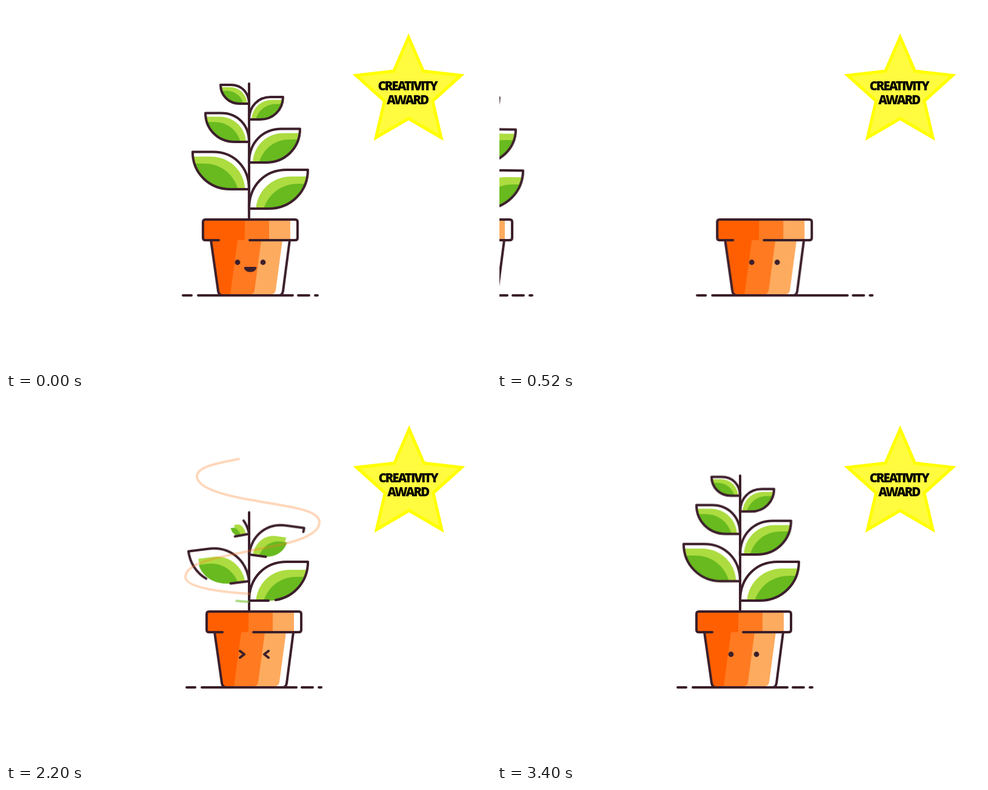
Write an HTML page without scripts that moves like this. It is 800 by 600 pixels and loops after 3.84 s.

```html
<!DOCTYPE html>
<html lang="en">
<head>
<meta charset="utf-8">
<title>Growing plant</title>
<style>
@property --p { syntax: "<number>"; inherits: true; initial-value: 1; }
@property --q { syntax: "<number>"; inherits: true; initial-value: 0; }
@property --j { syntax: "<number>"; inherits: true; initial-value: 0; }

html, body { margin: 0; width: 100%; height: 100%; overflow: hidden; background: #fff; }
svg { display: block; width: 100vw; height: 100vh; }

.line { fill: none; stroke: #3c1f2b; stroke-width: 4; stroke-linecap: round; stroke-linejoin: round; }
.ink { fill: #3c1f2b; }
.c1 { fill: #ff5f00; }
.c2 { fill: #ff7a20; }
.c3 { fill: #fdab5f; }
.c4 { fill: #fff; }

/* Leaves: --p is the drawn part, --q the droop in degrees */
.leaf {
  transform: translate(401px, var(--y)) scale(calc(var(--s) * var(--f, 1)), var(--s)) rotate(calc(var(--k, 1) * var(--q) * 1deg));
}
.edge { stroke-width: calc(4px / var(--s)); }
.edge, .stem { stroke-dasharray: calc(var(--p) * 1.01px) 2px; }
.tone { transform: translate(var(--dx, 0px), var(--dy, 0px)) scale(calc(.02 + .98 * var(--p)), calc(.28 + .72 * var(--p))); }
.light { fill: #acdc40; transform-origin: 7px 0; }
.dark { fill: #68ba1f; transform-origin: 19px 0; }

.n1 { --y: 334px; --s: 1; --k: 0; --dx: 4px; --dy: 3px; --t: 1685ms; }
.n2 { --y: 302px; --s: .96; --f: -1; --t: 1840ms; }
.n3 { --y: 258px; --s: .866; --t: 1960ms; }
.n4 { --y: 224px; --s: .742; --f: -1; --t: 2120ms; }
.n5 { --y: 187px; --s: .577; --t: 2555ms; }
.n6 { --y: 161px; --s: .485; --f: -1; --t: 2594ms; }

.loop, .grow .leaf, .grow .stem, .pop { animation: 3840ms linear infinite both; }
.grow .leaf { animation-name: grow; animation-delay: var(--t); }
.grow .stem { animation-name: rise; }
.grow { animation-name: sprout; }
.leave { animation-name: leave; }
.lean { animation-name: lean; transform-origin: 401px 352px; }
.slide { animation-name: slide; }
.reach { animation-name: reach; }
.tail { animation-name: tail; }
.tense { animation-name: tense; }
.shake { animation: shake 160ms linear infinite; }
.calm { animation-name: calm; }
.strain { animation-name: strain; }
.star { animation-name: nudge; }
.swirl { fill: none; stroke-width: 4; }
.s1 { animation-name: swirl1; }
.s2 { animation-name: swirl2; }
.pop { animation-name: pop; animation-delay: var(--t); transform-box: fill-box; transform-origin: center; }

@keyframes leave {
  0% { transform: none; }
  3.125% { transform: translateX(-13px); }
  6.25% { transform: translateX(-56px); }
  8.333% { transform: translateX(-121px); }
  10.417% { transform: translateX(-226px); }
  11.979% { transform: translateX(-329px); }
  13.542% { transform: translateX(-454px); }
  14.583%, 100% { transform: translateX(-540px); }
}
@keyframes lean {
  0% { transform: none; }
  6.25% { transform: rotate(3.6deg); }
  13.542%, 100% { transform: rotate(.8deg); }
}
@keyframes slide {
  0% { transform: translateX(1068px); animation-timing-function: cubic-bezier(.16, 1, .3, 1); }
  27.6%, 100% { transform: none; }
}
@keyframes reach {
  0% { stroke-dasharray: 2376px 3000px; animation-timing-function: cubic-bezier(.16, 1, .3, 1); }
  27.6%, 100% { stroke-dasharray: 156px 3000px; }
}
@keyframes tail {
  0% { transform: translateX(2220px); animation-timing-function: cubic-bezier(.16, 1, .3, 1); }
  27.6%, 100% { transform: none; }
}
@keyframes tense {
  0%, 15% { --j: 0; transform: translateX(6px); }
  26% { transform: translateX(4px); }
  30.2% { --j: 0; }
  30.21%, 86% { --j: 1; }
  87.5%, 100% { --j: 0; transform: translateX(4px); }
}
@keyframes shake {
  0%, 50%, 100% { transform: none; }
  25% { transform: translateX(calc(var(--j) * -1.5px)); }
  75% { transform: translateX(calc(var(--j) * 2px)); }
}
@keyframes calm {
  0%, 20.8% { opacity: 1; }
  20.81%, 78.1% { opacity: 0; }
  78.11%, 100% { opacity: 1; }
}
@keyframes strain {
  0%, 20.8% { opacity: 0; }
  20.81%, 78.1% { opacity: 1; }
  78.11%, 100% { opacity: 0; }
}
@keyframes sprout {
  0%, 43.74% { opacity: 0; }
  43.75%, 100% { opacity: 1; }
}
@keyframes rise {
  0%, 43.75% { --p: 0; }
  44.79% { --p: .093; }
  51% { --p: .43; }
  56% { --p: .68; }
  66%, 100% { --p: 1; }
}
@keyframes grow {
  0% { --p: 0; --q: 12; opacity: 0; animation-timing-function: cubic-bezier(.3, .7, .4, 1); }
  .05% { opacity: 1; }
  13% { --q: 7; }
  20.83% { --p: 1; --q: 0; }
  56.24% { --p: 1; --q: 0; opacity: 1; }
  56.25%, 100% { --p: 1; --q: 0; opacity: 0; }
}
/* Dash pattern: nothing, gap up to the tail, visible trail, gap */
@keyframes swirl1 {
  0%, 47% { stroke-dasharray: 0 0 0 2; }
  58% { stroke-dasharray: 0 0 .95 2; }
  61% { stroke-dasharray: 0 .1 .9 2; }
  67.7% { stroke-dasharray: 0 .885 .115 2; }
  69.5%, 100% { stroke-dasharray: 0 1 0 2; }
}
@keyframes swirl2 {
  0%, 57% { stroke-dasharray: 0 0 0 2; }
  67.7% { stroke-dasharray: 0 0 1 2; }
  73% { stroke-dasharray: 0 .68 .32 2; }
  77%, 100% { stroke-dasharray: 0 1 0 2; }
}
@keyframes pop {
  0% { transform: scale(0); }
  5%, 9% { transform: scale(1); }
  13%, 100% { transform: scale(0); }
}
@keyframes nudge {
  0%, 10.4% { transform: none; }
  10.41%, 100% { transform: translateX(1px); }
}

text {
  font: 800 20.5px "Open Sans", sans-serif;
  letter-spacing: -2.1px;
  text-anchor: middle;
}
</style>
</head>
<body>
<svg viewBox="0 0 800 600">
  <defs>
    <path id="blade" pathLength="1" d="M32 0H0C0-38 26-64 62-64H97C97-28 69 0 32 0Z"/>
    <clipPath id="inBlade"><use href="#blade"/></clipPath>
    <g id="leaf">
      <g clip-path="url(#inBlade)">
        <path class="tone light" d="M7 0C8-30 32-56 66-56H97C97-28 69 0 32 0Z"/>
        <path class="tone dark" d="M19 0C26-24 46-44 78-44H95C92-22 69 0 32 0Z"/>
      </g>
      <use class="line edge" href="#blade"/>
    </g>

    <path id="cup" d="M338 386L350 470Q351 477 358 477H450Q456 477 457 470L468 386"/>
    <clipPath id="inCup"><use href="#cup"/></clipPath>
    <g id="pot">
      <g clip-path="url(#inCup)">
        <path class="c4" d="M330 386H475V478H330Z"/>
        <path class="c3" d="M330 386H456L445 468Q444 475 438 475H330Z"/>
        <path class="c2" d="M330 386H421L410 468Q409 475 403 475H330Z"/>
        <path class="c1" d="M330 386H382L370 475H330Z"/>
      </g>
      <rect class="c4" x="325" y="352" width="156" height="34" rx="4"/>
      <path class="c3" d="M394 352H469V386H394Z"/>
      <path class="c2" d="M390 352H434V386H390Z"/>
      <path class="c1" d="M329 352H394V383Q394 386 391 386H329Q325 386 325 382V356Q325 352 329 352Z"/>
      <use class="line" href="#cup"/>
      <path class="line" d="M351 386H329Q325 386 325 382V356Q325 352 329 352H477Q481 352 481 356V382Q481 386 477 386H402"/>
    </g>
    <g id="eyes" class="ink">
      <circle cx="382" cy="422.5" r="4.4"/>
      <circle cx="424" cy="422.5" r="4.4"/>
    </g>

    <linearGradient id="lime" gradientUnits="userSpaceOnUse" x1="395" x2="450" y1="0" y2="0">
      <stop stop-color="#73bf2c"/>
      <stop offset="1" stop-color="#aadd3c"/>
    </linearGradient>
    <path id="spiral" pathLength="1" d="M401 336C340 332 293 324 293 308C293 282 360 274 403 264C450 256 514 244 514 218C514 196 460 192 401 181C360 174 312 162 312 142C312 112 435 118 435 88C435 82 428 80 419 78"/>
    <path id="badge" d="M664 45L690 105L756.5 112.5L706.5 157.5L721.5 222L664 188.5L606.5 222L621.5 157.5L571.5 112.5L638 105Z"/>
  </defs>

  <!-- departing plant -->
  <g class="loop leave">
    <path class="line" d="M292 477H306M317 477H473M482 477H500M510 477H514"/>
    <g class="loop lean">
      <path class="line" d="M401 352V128"/>
      <use class="leaf n1" href="#leaf"/>
      <use class="leaf n2" href="#leaf"/>
      <use class="leaf n3" href="#leaf"/>
      <use class="leaf n4" href="#leaf"/>
      <use class="leaf n5" href="#leaf"/>
      <use class="leaf n6" href="#leaf"/>
    </g>
    <use href="#pot"/>
    <use href="#eyes"/>
    <path class="ink" d="M395 430H411Q414 430 413 433Q410 438.5 403 438.5Q396 438.5 393 433Q392 430 395 430Z"/>
  </g>

  <!-- sprouting plant -->
  <g class="loop grow">
    <path class="line stem" pathLength="1" d="M401 352V128"/>
    <use class="leaf n1" href="#leaf"/>
    <use class="leaf n2" href="#leaf"/>
    <use class="leaf n3" href="#leaf"/>
    <use class="leaf n4" href="#leaf"/>
    <use class="leaf n5" href="#leaf"/>
    <use class="leaf n6" href="#leaf"/>
    <use class="swirl loop s1" href="#spiral" stroke="#ff7a20" opacity=".3" transform="translate(3 -13)"/>
    <use class="swirl loop s2" href="#spiral" stroke="url(#lime)" opacity=".57"/>
    <circle class="pop ink" style="--t:1640ms" cx="270.5" cy="181" r="1"/>
    <circle class="pop c3" style="--t:2360ms" cx="318.5" cy="79.5" r="1.8"/>
    <circle class="pop c3" style="--t:2340ms" cx="438.5" cy="125" r="1.8"/>
    <circle class="pop c3" style="--t:2300ms" cx="243.5" cy="284.5" r="1.8"/>
    <circle class="pop light" style="--t:2320ms" cx="543.5" cy="160.5" r="1.8"/>
    <circle class="pop ink" style="--t:2250ms" cx="562" cy="290" r="1"/>
    <path class="pop line" style="--t:2360ms;stroke-width:2.5" d="M501 86Q503 86 504.5 89"/>
  </g>

  <!-- arriving pot -->
  <g class="loop slide">
    <path class="line" d="M298 477H312"/>
    <path class="line loop reach" d="M323 477H2900"/>
    <path class="line loop tail" d="M488 477H506M516 477H520"/>
    <g class="loop tense">
      <g class="shake">
        <use href="#pot"/>
        <use class="loop calm" href="#eyes"/>
        <path class="line loop strain" d="M380 417L387 422.5L380 428M427 417L420 422.5L427 428"/>
      </g>
    </g>
  </g>

  <g class="loop star">
    <use href="#badge" fill="#ff0"/>
    <use href="#badge" fill="#fffb3f" transform="translate(664 142) scale(.87) translate(-664 -142)"/>
    <text x="662" y="139">CREATIVITY</text>
    <text x="662" y="162">AWARD</text>
  </g>
  <path fill="#fff" d="M0 0H4V600H0Z"/>
</svg>
</body>
</html>
```
